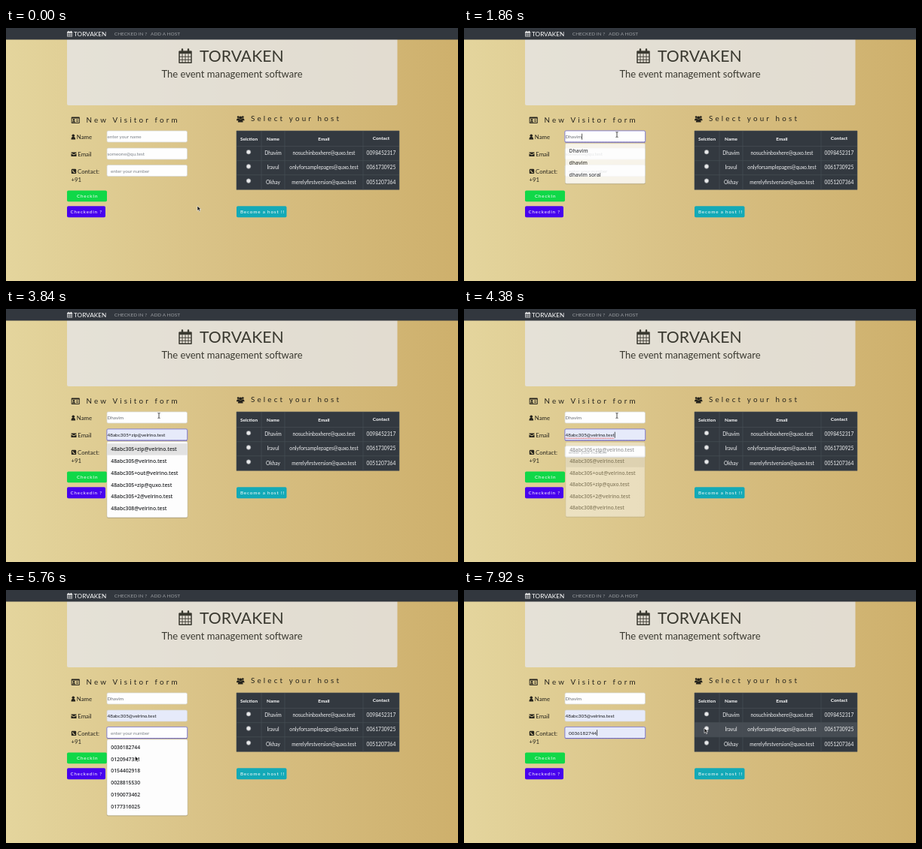
Write an HTML page that moves like this. It is 600 px wide and 337 px high and loops after 8 s.

```html
<!DOCTYPE html>
<html lang="en">
<head>
<meta charset="utf-8">
<title>Visitor check-in</title>
<style>
  html, body { margin: 0; width: 100%; height: 100%; overflow: hidden; }
  svg { display: block; width: 600px; height: 337px; font-family: Lato, "Open Sans", sans-serif; }
  .mid { text-anchor: middle; }
  .nav { font-size: 6.5px; fill: #9b9ea2; }
  .head { font-size: 9.8px; letter-spacing: 3.2px; fill: #25231c; }
  .label { font-size: 7.8px; fill: #25231c; }
  .btn { font-size: 6.3px; letter-spacing: .82px; fill: #fff; }
  .cell { font-size: 6.7px; fill: #f1f2f3; text-anchor: middle; }
  .th { font-size: 6.4px; font-weight: 700; fill: #fff; text-anchor: middle; }
  .value { font-size: 6.4px; }
  .hint { font-size: 6.3px; fill: #7d838a; }
  .item { font: 600 6.8px "Open Sans", "Noto Sans", sans-serif; fill: #26282b; }
</style>
</head>
<body>
<svg viewBox="0 0 600 337" xmlns="http://www.w3.org/2000/svg">
  <defs>
    <linearGradient id="sand">
      <stop offset="0" stop-color="#e4d59d"/>
      <stop offset=".5" stop-color="#d8c084"/>
      <stop offset="1" stop-color="#ceb06c"/>
    </linearGradient>
    <symbol id="calendar" viewBox="0 0 18 20">
      <path d="M1 4h16v15H1z" fill="none" stroke="currentColor" stroke-width="1.5" stroke-linejoin="round"/>
      <path d="M1 3.5h16V7H1z" fill="currentColor"/>
      <path d="M1 11h16M1 15h16M5 7v12M9 7v12M13 7v12" stroke="currentColor" stroke-width=".9"/>
      <path d="M5 1.3v3.6M13 1.3v3.6" stroke="currentColor" stroke-width="2.4" stroke-linecap="round"/>
    </symbol>
  </defs>

  <rect width="600" height="337" fill="url(#sand)"/>
  <rect x="81" y="10" width="438.5" height="93" rx="2" fill="#e6e7e8" fill-opacity=".8"/>
  <rect width="600" height="15.5" fill="#32373e"/>

  <use href="#calendar" x="81" y="3.6" width="7.4" height="8.2" color="#fff"/>
  <text x="90" y="10.8" font-size="8.2" fill="#fff">TORVAKEN</text>
  <text x="143.8" y="10.4" class="nav">CHECKED IN ?</text>
  <text x="192" y="10.4" class="nav">ADD A HOST</text>

  <use href="#calendar" x="229" y="27" width="18" height="20.5" color="#3a3930"/>
  <text x="257" y="45" font-size="21.2" fill="#3a3930">TORVAKEN</text>
  <text x="300" y="66.3" class="mid" font-size="13" fill="#3a3930">The event management software</text>

  <g fill="#25231c">
    <path fill-rule="evenodd" d="M87.500 118.500h9.500q.8 0 .8.800v7q0 .8-.8.800h-9.500q-.8 0-.8-.800v-7q0-.8.800-.800zM87.600 120.400v5.700h9.300v-5.700z"/>
    <circle cx="90" cy="122.300" r="1.200"/>
    <path d="M88 125.600q0-2 2-2t2 2zM93 121.700h3.200v.9H93zM93 123.800h3.200v.9H93z"/>
    <circle cx="89.300" cy="143.300" r="1.800"/>
    <path d="M86.500 148.400q0-3.600 2.800-3.600t2.800 3.600z"/>
    <path d="M86.500 165.500h7v.8l-3.500 2.300-3.500-2.300zM86.500 167.200l3.500 2.300 3.500-2.300v3.700h-7z"/>
    <rect x="86.800" y="187.700" width="6.400" height="6.400" rx="1.200"/>
    <path d="M88.500 189.200q.2 2.900 3.200 3.500" fill="none" stroke="#dcca92" stroke-width="1.100"/>
    <circle cx="308.200" cy="118.600" r="1.400"/><circle cx="314.300" cy="118.600" r="1.400"/>
    <path d="M306 123.300q0-3 2.200-3t2.200 3zM312.100 123.300q0-3 2.200-3t2.200 3z"/>
    <circle cx="311.250" cy="119.600" r="2"/>
    <path d="M307.900 125.600q0-4.200 3.350-4.200t3.350 4.200z"/>
  </g>
  <text x="106.500" y="126" class="head">New Visitor form</text>
  <text x="325" y="124.400" class="head">Select your host</text>
  <text x="93.800" y="148" class="label">Name</text>
  <text x="95.300" y="170.800" class="label">Email</text>
  <text x="95" y="193.600" class="label">Contact:</text>
  <text x="86.500" y="204.600" class="label">+91</text>

  <rect x="81" y="216.500" width="53" height="14.700" rx="1.800" fill="#10d848"/>
  <text x="94" y="226.100" class="btn">CheckIn</text>
  <rect x="81" y="237.300" width="51" height="14.900" rx="1.800" fill="#4802ee"/>
  <text x="85.500" y="247" class="btn">Checkedin ?</text>
  <rect x="306" y="237.300" width="66.500" height="14.900" rx="1.800" fill="#13a9b7"/>
  <text x="311" y="247" class="btn">Become a host !!</text>

  <g id="live"></g>
</svg>

<script>
const LOOP = 8000, TICK = 60, BLINK = 360;
const live = document.getElementById('live');
const pen = document.createElement('canvas').getContext('2d');

const hosts = [
  ['Dhavim', 'nosuchinboxhere@quxo.test', '0098452317'],
  ['Iravul', 'onlyforsamplepages@quxo.test', '0061730925'],
  ['Okhay', 'merelyfirstversion@quxo.test', '0051207364']
];
const mail = '48abc305@velrino.test';
const phone = '0036182744';

// keys: when each character is typed; sel: [time, highlighted row]
const fields = [
  { y: 137, x: 134.5, hint: 'enter your name', ink: '#686d74', focus: [780, 2220],
    text: 'Dhavim', keys: [1080, 1200, 1320, 1440, 1560, 1620],
    open: 780, close: 1860, fade: [.83, .4], sel: [], fill: Infinity,
    options: ['Dhavim', 'Tirosh', 'dhavim', 'Mirel', 'dhavim soral', 'Okhay'] },
  { y: 160, x: 134.5, hint: 'someone@qu.test', ink: '#686d74', focus: [2220, 5400],
    text: mail, keys: [2940, 3120, 3240, 3300, 3420, 3480],
    open: 2940, close: 4320, fade: [.75, .45], sel: [[3780, 0], [4140, 1]], fill: 4320,
    options: ['40@quxo.test', '48abc305+zip@velrino.test', mail, '48def007@velrino.test',
      '48abc305+out@velrino.test', '48abc305+zip@quxo.test', '48abc305+2@velrino.test',
      '48abc308@velrino.test'] },
  { y: 182.5, x: 139, hint: 'enter your number', ink: '#5b6067', focus: [5400, LOOP],
    text: phone, keys: [5880, 6120, 6480, 6540, 6660],
    open: 5400, close: 6960, fade: [.75, .4], sel: [[6840, 0]], fill: 6900,
    options: [phone, '0120947351', '0154402918', '0028815530', '0190073462', '0177316025'] }
];

const path = [
  [360, 254, 237], [600, 203, 142], [4620, 203, 142], [5220, 184, 194], [5460, 184, 194],
  [5760, 171.5, 221.3], [7020, 171.5, 221.3], [7620, 322, 189], [7800, 322, 189], [7920, 319, 184]
];

const rect = (x, y, w, h, attrs) => `<rect x="${x}" y="${y}" width="${w}" height="${h}" ${attrs}/>`;
const text = (x, y, cls, s, attrs = '') => `<text x="${x}" y="${y}" class="${cls}" ${attrs}>${s}</text>`;
const widthOf = s => { pen.font = '6.4px Lato, "Open Sans", sans-serif'; return pen.measureText(s).width; };
const lastAt = (steps, t) => steps.filter(s => s[0] <= t).pop();

function pointer(t) {
  const i = path.findIndex(p => p[0] > t);
  if (i === 0) return path[0].slice(1);
  if (i < 0) return path[path.length - 1].slice(1);
  const [t0, x0, y0] = path[i - 1], [t1, x1, y1] = path[i];
  const u = (t - t0) / (t1 - t0), e = u * u * (3 - 2 * u);
  return [x0 + (x1 - x0) * e, y0 + (y1 - y0) * e];
}

function state(f, t) {
  const typed = f.text.slice(0, f.keys.filter(k => k <= t).length);
  const list = f.options.filter(o => o.toLowerCase().startsWith(typed.toLowerCase())).slice(0, 6);
  const sel = lastAt(f.sel, t);
  const filled = t >= f.fill;
  const preview = sel && !filled;
  const value = filled ? f.text : preview ? list[sel[1]] : typed;
  return { list, row: sel ? sel[1] : -1, filled, value, auto: filled || preview,
    focused: t >= f.focus[0] && t < f.focus[1] };
}

function drawField(f, t) {
  const s = state(f, t), base = f.y + 10.2;
  let out = '';
  if (s.focused) out += rect(133.2, f.y - .8, 108.3, 16.8, 'rx="2.6" fill="#6a7cf0" fill-opacity=".4"');
  out += rect(134, f.y, 106.5, 15, `rx="1.8" fill="${s.auto ? '#e6eafa' : '#fefefe'}" stroke="${s.focused ? '#7f78cf' : '#d5d6d3'}" stroke-width=".7"`);
  if (s.focused) out += `<path d="M135 ${f.y + 15}h105" stroke="#5a4ca8" stroke-width=".9" stroke-dasharray="1.2 .8"/>`;
  out += s.value
    ? text(f.x, base, 'value', s.value, `fill="${s.auto ? '#17191c' : f.ink}"`)
    : text(f.x, base, 'hint', f.hint);
  if (!s.focused) return out;

  const end = f.x + widthOf(s.value);
  if (s.filled && f.text === mail)
    out += `<path d="M${f.x} ${base + 2}H${end}" stroke="#e2383c" stroke-width=".9" stroke-dasharray="1.1 .7"/>`;
  const beat = [f.focus[0], ...f.keys, f.fill].filter(k => k <= t).pop();
  if (Math.floor((t - beat) / BLINK) % 2 === 0)
    out += rect(end + .3, f.y + 3.7, .7, 8, 'fill="#111"');
  return out;
}

function drawList(f, t) {
  if (t < f.open) return '';
  const step = (t - f.close) / TICK;
  const alpha = step >= 0 ? f.fade[Math.floor(step)] || 0 : t < f.open + TICK ? .7 : 1;
  if (!alpha) return '';
  const s = state(f, t), top = f.y + 16.6, h = s.list.length * 15.8 + 6.4;
  const k = step >= 0 ? 1 - (1 - alpha) * .035 : 1, cy = top + h / 2;
  let out = `<g opacity="${alpha}" transform="translate(187.5 ${cy}) scale(${k}) translate(-187.5 ${-cy})">`;
  out += rect(133.8, top + .6, 107.4, h + .4, 'rx="2" fill="#60563a" fill-opacity=".35"');
  out += rect(134, top, 107, h, 'rx="1.8" fill="#fdfdfd" stroke="#c9c6bb" stroke-width=".5"');
  s.list.forEach((label, i) => {
    const y = top + 2.6 + i * 15.8;
    const lone = s.list.length === 1 && t >= 6600;
    if (i === s.row || lone) out += rect(134, y, 107, 15.4, `fill="${lone ? '#f1f2f1' : '#e2e2e2'}"`);
    out += text(139.3, y + 10, 'item', label);
  });
  return out + '</g>';
}

function drawTable(px, py) {
  const cols = [306, 339, 370, 474, 522], rows = [137, 157.5, 176.7, 195.7, 215.3];
  const mid = i => (cols[i] + cols[i + 1]) / 2;
  let out = rect(306, 137, 216, 78.3, 'fill="#333940"');
  hosts.forEach((_, i) => {
    if (px > 306 && py > rows[i + 1] && py < rows[i + 2])
      out += rect(306, rows[i + 1], 216, rows[i + 2] - rows[i + 1], 'fill="#464c53"');
  });
  const lines = rows.map(y => `M306 ${y}h216`).join('') + cols.map(x => `M${x} 137v78.3`).join('');
  out += `<path d="${lines}" stroke="#4a5158" stroke-width=".6"/>`;
  ['Selction', 'Name', 'Email', 'Contact'].forEach((h, i) => {
    out += text(mid(i), i === 3 ? 149.4 : 150, 'th', h);
  });
  hosts.forEach((cells, r) => {
    const y = 165.2 + r * 19.2;
    out += `<circle cx="322" cy="${y}" r="2.8" fill="#e9eaeb" stroke="#8f9398" stroke-width=".7"/>`;
    cells.forEach((c, i) => { out += text(mid(i + 1), y + 4, 'cell', c); });
  });
  return out;
}

function drawPointer(x, y) {
  const beam = fields.some(f => x > 134 && x < 240.5 && y > f.y && y < f.y + 15);
  const shape = beam
    ? '<path d="M-1.500-3.500q1.500 0 1.500 1v5q0 1-1.500 1M1.500-3.500Q0-3.500 0-2.500M0 2.500q0 1 1.500 1" fill="none" stroke="#222" stroke-width=".8"/>'
    : '<path d="M0 0v6.600l1.600-1.500 1.100 2.500 1.200-.5-1.100-2.500h2.100z" fill="#111" stroke="#fff" stroke-width=".6"/>';
  return `<g transform="translate(${x} ${y})">${shape}</g>`;
}

function draw(t) {
  const [x, y] = pointer(t);
  live.innerHTML = drawTable(x, y) + fields.map(f => drawField(f, t)).join('') +
    fields.map(f => drawList(f, t)).join('') + drawPointer(x, y);
}

const start = performance.now();
let shown = -1;
function frame() {
  const now = (performance.now() - start) % LOOP;
  const t = Math.floor(now / TICK) * TICK;
  if (t !== shown) draw(shown = t);
  requestAnimationFrame(frame);
}
frame();
</script>
</body>
</html>
```
